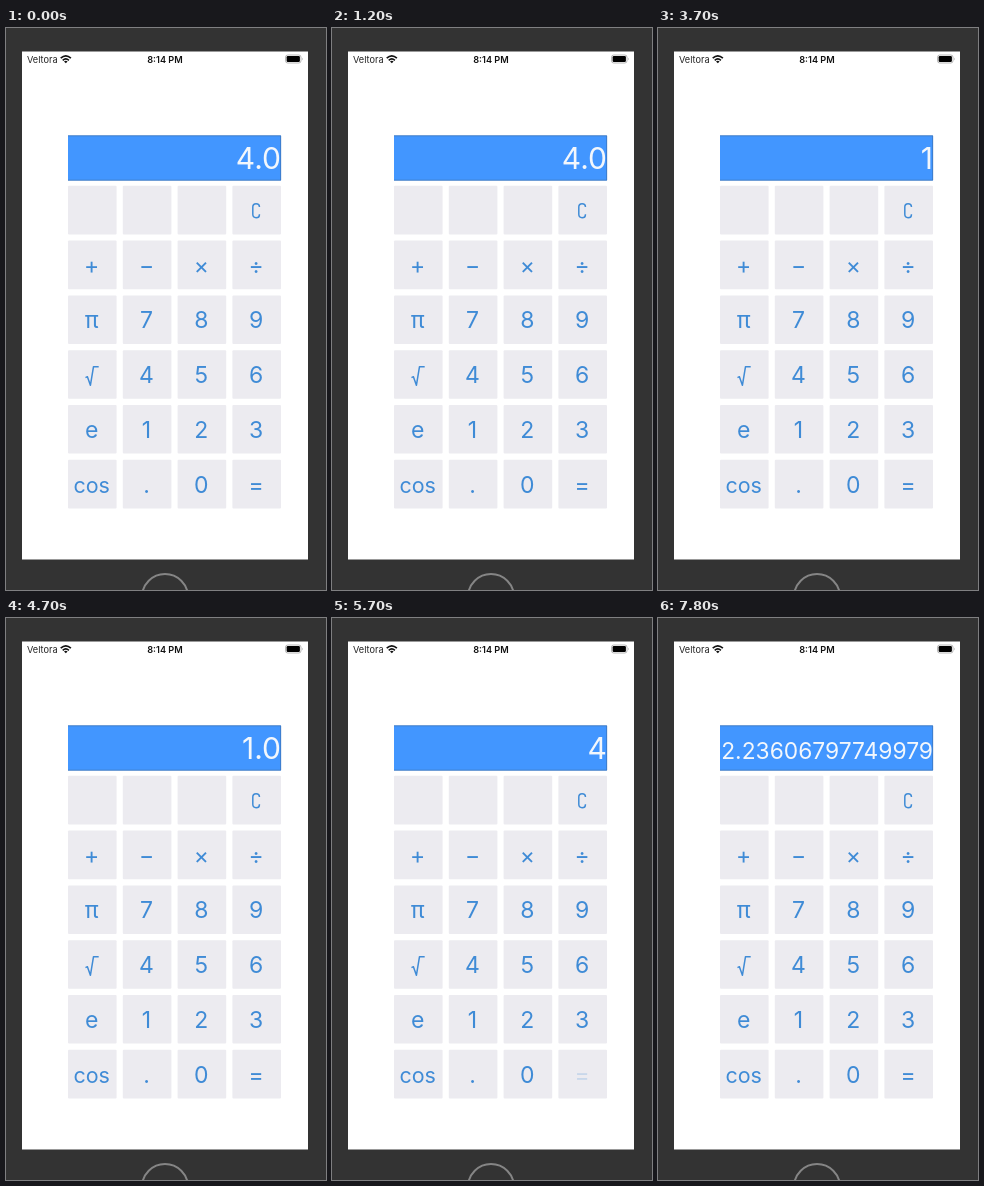
Animation, 320 px wide and 562 px high, one loop 8000 ms. Source, as an HTML page:

```html
<!DOCTYPE html>
<html lang="en">
<head>
<meta charset="utf-8">
<title>Calculator</title>
<style>
html, body { margin: 0; width: 100%; height: 100%; overflow: hidden; background: #333; }
svg { display: block; width: 320px; height: 562px; font-family: Inter, "Open Sans", sans-serif; }
.status { font-size: 9.2px; fill: #222; }
.clock { font-weight: 600; fill: #111; text-anchor: middle; }
.keys rect { fill: #ecebf0; }
.keys text { font-size: 23px; fill: #3f8bd6; text-anchor: middle; }
.keys path { fill: none; stroke: #3f8bd6; stroke-width: 1.5; stroke-linejoin: round; }
.keys .word { font-size: 21.5px; }

/* One tap: dims at once, holds, then fades back. */
.tap { animation: tap 8s linear infinite; animation-delay: calc(var(--at) - 8s); }
@keyframes tap {
  0%, 1.5% { opacity: .2; }
  6.25%, 100% { opacity: 1; }
}

.readout { font-size: 30px; fill: #f3f7fc; text-anchor: end; }
.readout text { visibility: hidden; animation: 8s step-end infinite; }
.readout .long { font-size: 22.8px; }
#v1 { animation-name: v1; }
#v2 { animation-name: v2; }
#v3 { animation-name: v3; }
#v4 { animation-name: v4; }
#v5 { animation-name: v5; }
#v6 { animation-name: v6; }
@keyframes v1 { 0% { visibility: visible; } 39.6% { visibility: hidden; } }
@keyframes v2 { 39.6% { visibility: visible; } 50.9% { visibility: hidden; } }
@keyframes v3 { 50.9% { visibility: visible; } 63.4% { visibility: hidden; } }
@keyframes v4 { 63.4% { visibility: visible; } 72.2% { visibility: hidden; } }
@keyframes v5 { 72.2% { visibility: visible; } 88.4% { visibility: hidden; } }
@keyframes v6 { 88.4% { visibility: visible; } 100% { visibility: visible; } }
</style>
</head>
<body>
<svg viewBox="0 0 320 562">
  <rect width="320" height="562" fill="#333"/>
  <rect x="16" y="23.5" width="286" height="508" fill="#fff"/>
  <circle cx="159" cy="569" r="23" fill="none" stroke="#858585" stroke-width="2"/>

  <g class="status">
    <text x="21" y="34.5">Veltora</text>
    <text class="clock" x="159" y="34.5">8:14 PM</text>
    <g fill="none" stroke="#111" stroke-width="1.6">
      <path d="M54.7 30.2Q59.8 25.6 64.9 30.2M56.7 32.3Q59.8 29.6 62.9 32.3"/>
      <path d="M58 33.4L59.8 35.3L61.6 33.4Q59.8 32 58 33.4Z" fill="#111" stroke="none"/>
    </g>
    <rect x="279.5" y="27" width="15.5" height="8" rx="2.2" fill="none" stroke="#999" stroke-width=".7"/>
    <rect x="280.6" y="28.1" width="13.3" height="5.8" rx="1.2" fill="#000"/>
    <path d="M296 29.7Q297.4 31 296 32.3Z" fill="#999"/>
  </g>

  <rect x="62" y="107.5" width="213" height="45" fill="#4296ff"/>
  <path d="M62 107.8H274.7V152.2H62" fill="none" stroke="#3c6fae" stroke-width=".7"/>
  <g class="readout">
    <text id="v1" x="275" y="140.5">4.0</text>
    <text id="v2" x="275" y="140.5">1</text>
    <text id="v3" x="275" y="140.5">1.0</text>
    <text id="v4" x="275" y="140.5">4</text>
    <text id="v5" x="275" y="140.5">5.0</text>
    <text id="v6" x="275" y="140.5" class="long">2.23606797749979</text>
  </g>
  <g class="keys" id="keys"></g>
</svg>
<script>
const rows = ["   C", "+−×÷", "π789", "√456", "e123", "c.0="];
const taps = { 1: 3070, "+": 3970, 4: 4970, "=": 5670, "√": 6970 };
const glyphs = {
  C: "M3.3 -3.6V-4.2Q3.3 -7 0 -7Q-3.3 -7 -3.3 -3.6V3.6Q-3.3 7 0 7Q3.3 7 3.3 4.2V3.6",
  "√": "M-6.2 2.6L-4.3 1.6L-1.3 10.2L1.8 -8.4H7"
};
const pitch = 54.8, side = 48.6;

function label(key, cx, cy) {
  if (glyphs[key]) return `<path transform="translate(${cx} ${cy})" d="${glyphs[key]}"/>`;
  const word = key === "c";
  return `<text x="${cx}" y="${cy + 8}"${word ? ' class="word"' : ""}>${word ? "cos" : key}</text>`;
}

function button(key, col, row) {
  const x = 62 + col * pitch, y = 157.8 + row * pitch;
  const tap = key in taps ? ` class="tap" style="--at:${taps[key]}ms"` : "";
  const face = key === " " ? "" : `<g${tap}>${label(key, x + side / 2 - 0.6, y + side / 2 + 0.6)}</g>`;
  return `<rect x="${x}" y="${y}" width="${side}" height="${side}" rx="1"/>${face}`;
}

document.getElementById("keys").innerHTML =
  rows.map((row, r) => [...row].map((key, c) => button(key, c, r)).join("")).join("");
</script>
</body>
</html>
```
